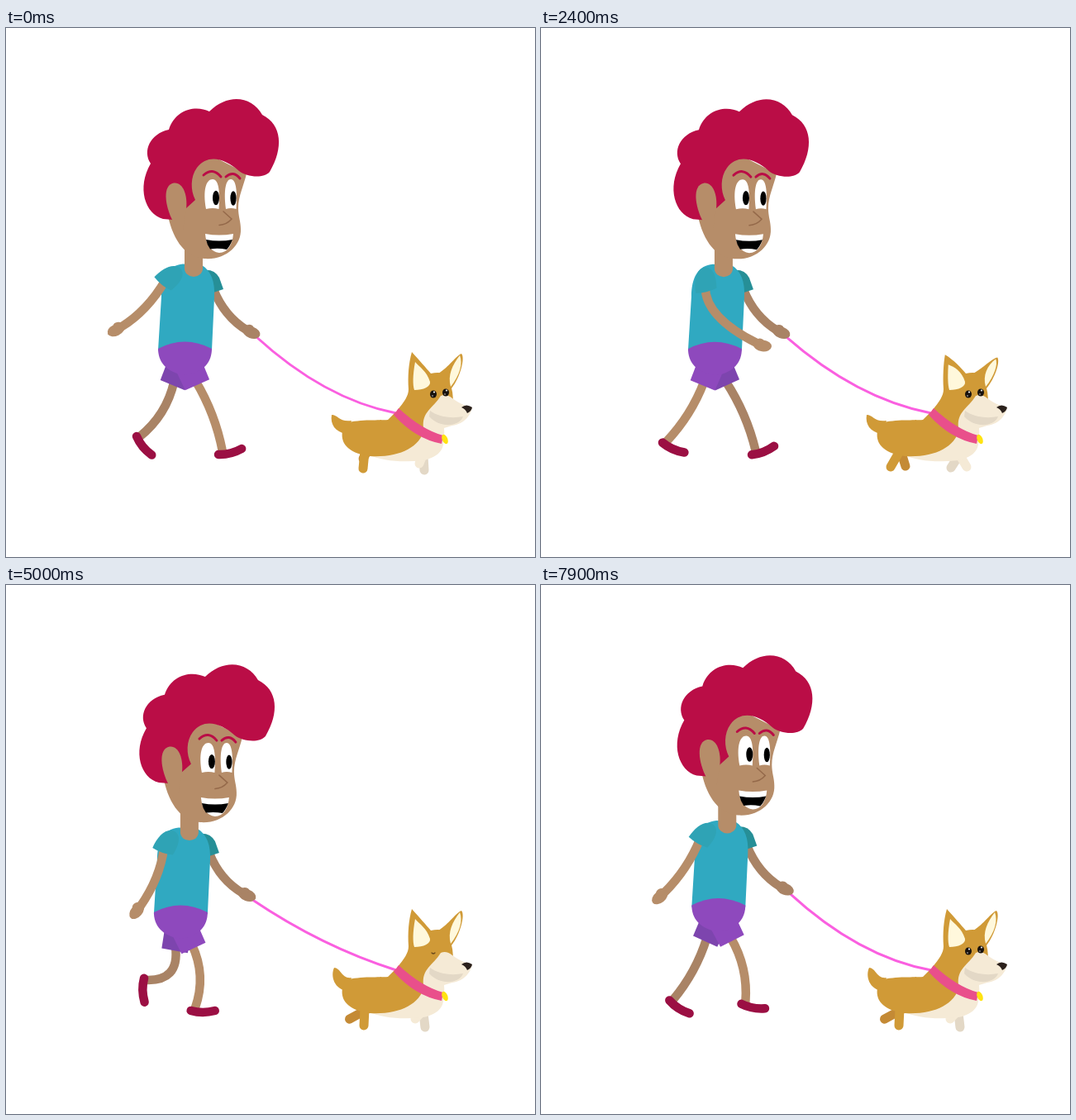
Animation, 640 px wide and 640 px high, one loop 8 s. Source, as an HTML page with a canvas:

```html
<!DOCTYPE html>
<html lang="en">
<head>
<meta charset="utf-8">
<title>Walking the dog</title>
<style>
html, body { margin: 0; width: 100%; height: 100%; overflow: hidden; background: #fff; }
canvas { display: block; width: 100vw; height: 100vh; }
</style>
</head>
<body>
<canvas id="stage" width="640" height="640"></canvas>
<script>
const g = document.getElementById('stage').getContext('2d');
const LOOP = 8000, STEP = 100, WALK = 1597, TROT = 725;
const SKIN = '#b68d69', SKIN_FAR = '#a98365', HAIR = '#ba0d46', SHOE = '#9b0f43';
const SHIRT = '#30a9c1', SHORTS = '#8e49bd', SHORTS_FAR = '#7d45ae';
const TAN = '#d09a37', TAN_FAR = '#c48a35', CREAM = '#f5ead6', CREAM_FAR = '#e3d8c6';
const RAD = Math.PI / 180;

// Walk keys: sixteenths of a cycle, then values
const SWAY = [[0, 0], [1, -3], [2, -5], [4, -6], [7, -4], [8, -6], [10, -8], [12, -6], [15, -2]];
const BOB = [[0, 0], [1, 6], [2, 10], [3, 9], [4, 3], [5, -3], [6, -4], [7, -3],
  [8, 0], [9, 6], [10, 10], [11, 8], [12, -1], [13, -9], [14, -7], [15, -1]];
const HAND = [[0, 134, 365], [1, 145, 375], [2, 162, 385], [4, 206, 398], [7, 254, 389],
  [8, 273, 384], [9, 262, 390], [12, 205, 398], [15, 149, 379]];
const THIGH = [[0, 15], [1, 17], [2, 16], [4, 5], [6, -10], [7, -15], [8, -14], [9, -12],
  [10, -7], [12, 5], [14, 18], [15, 17]];
// heel x, heel y, foot angle
const FOOT_NEAR = [[0, 257, 516, -14], [1, 240, 517, -5], [2, 225, 515, 0], [4, 199, 515, 0],
  [6, 171, 515, 4], [7, 152, 509, 11], [8, 147, 502, 23], [9, 150, 492, 60],
  [10, 160, 480, 82], [12, 193, 478, 45], [14, 230, 492, 18], [15, 240, 505, 14]];
const FOOT_FAR = [[0, 255, 516, -21], [1, 240, 517, -8], [2, 224, 515, 0], [4, 199, 515, 0],
  [6, 172, 514, 8], [7, 156, 504, 30], [8, 158, 494, 51], [9, 159, 488, 75],
  [10, 166, 476, 90], [12, 193, 478, 45], [14, 232, 487, 12], [15, 237, 501, 4]];

// Trot keys: milliseconds within a cycle
const PAW_BACK = [[0, 432, 533], [150, 429, 533], [225, 423, 531], [275, 414, 527],
  [337, 423, 523], [362, 431, 522], [512, 443, 528], [587, 440, 531], [650, 433, 533]];
const PAW_FRONT = [[0, 500, 527], [150, 511, 532], [225, 515, 531], [275, 517, 531],
  [450, 509, 534], [650, 495, 525], [700, 499, 527]];
const PAW_FRONT_FAR = [[0, 506, 535], [150, 501, 535], [225, 496, 532], [275, 494, 532],
  [450, 499, 528], [650, 507, 535], [700, 506, 535]];
const EARS = [[0, 0], [150, 1], [275, 1], [500, 0], [650, 0]];
const TAIL = [[0, 0], [225, 0], [275, 1], [650, 1], [700, 0]];

// Smooth periodic interpolation through keys
function sample(keys, p, period) {
  const n = keys.length;
  p = (p % period + period) % period;
  const at = i => {
    const turn = Math.floor(i / n), k = keys[i - turn * n];
    return [k[0] + turn * period, ...k.slice(1)];
  };
  let i = n - 1;
  while (keys[i][0] > p) i--;
  const [a, b, c, d] = [at(i - 1), at(i), at(i + 1), at(i + 2)];
  const h = c[0] - b[0], s = (p - b[0]) / h, s2 = s * s, s3 = s2 * s;
  return b.slice(1).map((v, j) => {
    j++;
    const m0 = (c[j] - a[j]) / (c[0] - a[0]) * h, m1 = (d[j] - b[j]) / (d[0] - b[0]) * h;
    return v * (2 * s3 - 3 * s2 + 1) + c[j] * (3 * s2 - 2 * s3) + m0 * (s3 - 2 * s2 + s) + m1 * (s3 - s2);
  });
}

function fill(d, color) {
  g.fillStyle = color;
  g.fill(new Path2D(d));
}
function line(d, color, width, cap = 'round') {
  g.strokeStyle = color;
  g.lineWidth = width;
  g.lineCap = cap;
  g.stroke(new Path2D(d));
}
function oval(x, y, rx, ry, color, turn = 0) {
  g.fillStyle = color;
  g.beginPath();
  g.ellipse(x, y, rx, ry, turn, 0, 7);
  g.fill();
}
function placed(x, y, turn, draw) {
  g.save();
  g.translate(x, y);
  g.rotate(turn);
  draw();
  g.restore();
}
function spin(x, y, a) {
  const c = Math.cos(a), s = Math.sin(a);
  return [x * c - y * s, x * s + y * c];
}

function leg(keys, p, dx, dy, skin, cloth) {
  const [hx, hy, deg] = sample(keys, p, 16);
  const turn = -sample(THIGH, p, 16)[0] * 1.6 * RAD;
  const px = 216 + dx, py = 397 + dy;
  const [ox, oy] = spin(0, 33, turn);
  const x0 = px + ox, y0 = py + oy, a = deg * RAD;
  const x1 = hx + 5 * Math.cos(a), y1 = hy + 5 * Math.sin(a) - 3;
  const d = Math.hypot(x1 - x0, y1 - y0);
  const bend = 2 * (4 + Math.max(0, 87 - d) * 0.4) / d;
  const cx = (x0 + x1) / 2 + (y1 - y0) * bend, cy = (y0 + y1) / 2 - (x1 - x0) * bend;
  line(`M${x0},${y0}Q${cx},${cy} ${x1},${y1}`, skin, 10.5);
  placed(hx, hy, a, () => line('M0,0Q14,4 29,0', SHOE, 10.5));
  placed(px, py, turn, () => fill('M-17,0L-16,38L16,38L17,0Z', cloth));
}

function hand(x, y, turn, color) {
  placed(x, y, turn, () => {
    oval(1, 0, 11, 7, color);
    oval(-4, -4, 6, 4, color, -0.4);
  });
}

function nearArm(p) {
  const [hx, hy] = sample(HAND, p, 16);
  const a = Math.atan2(206 - hx, hy - 300);
  const turn = (a > 0 ? a * 0.9 : a * 0.25) - 4 * RAD;
  const [ox, oy] = spin(-5, 15, turn);
  const x0 = 206 + ox, y0 = 297 + oy;
  const cx = x0 - Math.max(0, x0 - hx - 25) * 0.65, cy = y0 + 37;
  const dir = Math.atan2(hy - cy, hx - cx), flip = hx < x0;
  const x1 = hx - 6 * Math.cos(dir), y1 = hy - 6 * Math.sin(dir);
  line(`M${x0},${y0}Q${cx},${cy} ${x1},${y1}`, SKIN, 10.5);
  g.save();
  g.translate(hx, hy);
  if (flip) g.scale(-1, 1);
  hand(0, 0, flip ? Math.PI - dir - 0.1 : dir - 0.35, SKIN);
  g.restore();
  placed(206, 297, turn, () =>
    fill('M-18,20C-17,6 -12,-6 -2,-8C8,-8 12,2 8,20Q-5,23 -18,20Z', '#2fa3b5'));
}

function head(bob) {
  fill('M216,255H238V291A11,10 0 0 1 216,291Z', SKIN);
  fill('M195,222C200,252 215,278 240,279C266,281 285,263 284,243C284,234 281,228 281,218C281,203 288,190 291,176L240,150L205,180Z', SKIN);
  g.save();
  g.translate(0, 232);
  g.scale(1, 1 - bob * 0.0015);
  g.translate(0, -232);
  fill('M202,232L190,231C168,225 158,193 175,164C165,149 174,128 197,123C205,98 230,93 246,101C269,78 298,83 310,105C334,117 336,145 319,174C311,183 291,180 282,173C264,157 244,152 231,169C223,180 223,196 229,208L218,218Z', HAIR);
  g.restore();
  fill('M202,234C192,215 189,190 203,187.500C214,186 220,202 218,219L214,244Z', SKIN);
  line('M239,178Q250,168 260,180M266,180Q275,172 283,182', HAIR, 3);
  fill('M242,219C238,196 242,183 250,183C258,183 259,200 257.500,219Q250,217 242,219Z', '#fff');
  fill('M266,219C263,196 266,183 272,183C279,183 280,200 278.500,219Q272,217 266,219Z', '#fff');
  oval(254, 205.5, 4, 8.7, '#000');
  oval(275, 206, 3.6, 8.7, '#000');
  line('M263,222L273,231Q267,238 258,238.500', '#94694a', 1.5);
  fill('M241,249Q258,252 275,249C274,262 268,272 258,272C248,271 242,262 241,249Z', '#fff');
  fill('M242,256Q258,259 274,256Q271,264 267,268Q257,266 247,267.500Q243,262 242,256Z', '#000');
}

function walker(p) {
  const [dx] = sample(SWAY, p, 16), [bob] = sample(BOB, p, 16), dy = bob * 0.8;
  const gx = 297 + dx, gy = 368 + bob * 0.7;
  line(`M${gx + 5},${gy + 5}Q${385 + dx / 2},${449 - bob * 1.1} 472,466`, '#fa5fe0', 3);
  line(`M${251 + dx},${316 + dy}Q${264 + dx},${349 + dy} ${gx - 5},${gy - 2}`, SKIN_FAR, 10.5);
  hand(gx - 1, gy, 0.35, SKIN_FAR);
  leg(FOOT_FAR, p + 8, dx, dy, SKIN_FAR, SHORTS_FAR);
  leg(FOOT_NEAR, p, dx, dy, SKIN, SHORTS);
  g.save();
  g.translate(dx, dy);
  fill('M238,293Q252,291 258,302L263,316L251,320Z', '#268f97');
  fill('M188,325C188,302 196,287 214,285.500L237,287C248,294 253,306 252,326L249,390H184Z', SHIRT);
  fill('M184,388Q216,371 249,388C249,403 240,417 217,420C193,417 184,403 184,388Z', SHORTS);
  head(bob);
  nearArm(p);
  g.restore();
}

function paw(x0, y0, [x, y], color) {
  line(`M${x0},${y0}L${x},${y}`, color, 11);
}

function dog(ms, blink) {
  const [ear] = sample(EARS, ms, TROT), [wag] = sample(TAIL, ms, TROT);
  const [bx, by] = sample(PAW_BACK, ms + TROT / 2, TROT);
  paw(436, 514, [bx + 1, by - 1], TAN_FAR);
  paw(505, 518, sample(PAW_FRONT_FAR, ms, TROT), CREAM_FAR);
  paw(505, 514, sample(PAW_FRONT, ms, TROT), CREAM);
  paw(434, 512, sample(PAW_BACK, ms, TROT), TAN);

  fill('M438,516C460,517 492,508 503,485L529,500C530,512 520,520 505,523C480,526 455,524 438,516Z', CREAM);
  const tx = 394 + 3 * wag, ty = 468 - 5 * wag;
  fill(`M412,491C398,489 392,${ty + 11} ${tx},${ty}C${tx + 8},${ty} ${tx + 9},477 418,475Z`, TAN);
  fill('M410,478C430,473 452,475 462,474L471,465L506,486C500,508 475,520 440,518C418,515 404,505 407,488Z', TAN);

  const lx = 491 - 2 * ear, ly = 392 + 3 * ear, rx = 551 + ear, ry = 394 + 4 * ear;
  fill(`M523,418C536,410 545,${ry + 2} ${rx},${ry}C556,${ry + 5} 549,424 539,436Z`, TAN);
  fill(`M473,463C482,452 487,445 487,437C486,421 487,406 ${lx},${ly}C500,402 508,411 514,418Q526,415 532,420Q540,430 541,450L526,462L508,488Z`, TAN);
  fill('M526,445Q533,442 540,448C548,454 555,457 564,459C563,466 556,479 540,481L530,484Q531,494 528,499L505,484C503,464 516,461 526,445Z', CREAM);
  fill('M513,463C522,470 538,473 553,470C549,482 525,485 512,470Z', CREAM_FAR);
  fill('M551,459Q557,454 564,459Q563,464 558,466Q556,461 551,459Z', '#2b211c');
  fill(`M${lx + 4},${ly + 12}C492,420 492,432 494,438C505,438 514,434 513,428C509,415 500,410 ${lx + 4},${ly + 12}Z`, '#fff8dc');
  fill(`M${rx - 2},${ry + 2}C540,408 534,420 538,434C549,420 553,406 ${rx - 2},${ry + 2}Z`, '#fff8dc');
  if (blink) {
    line('M515,445Q517,447 519,445', '#6b4a1d', 1.2);
  } else {
    for (const [x, y] of [[517, 443], [532, 441]]) {
      oval(x, y, 4, 4.5, '#17110d');
      oval(x + 1, y - 2.5, 1.1, 1.1, '#fff');
      oval(x - 1, y + 2, 0.7, 0.7, '#fff');
    }
  }
  fill('M475,460L469,468Q495,497 527,503L529,493Q503,486 475,460Z', '#e94f8b');
  oval(531, 497.5, 3.3, 6, '#ffe312', -0.4);
}

function frame(now) {
  const t = Math.floor(now % LOOP / STEP) * STEP;
  g.fillStyle = '#fff';
  g.fillRect(0, 0, 640, 640);
  walker(t / WALK * 16);
  dog(t, t >= 4900 && t < 5100);
  requestAnimationFrame(frame);
}
frame(0);
</script>
</body>
</html>
```
